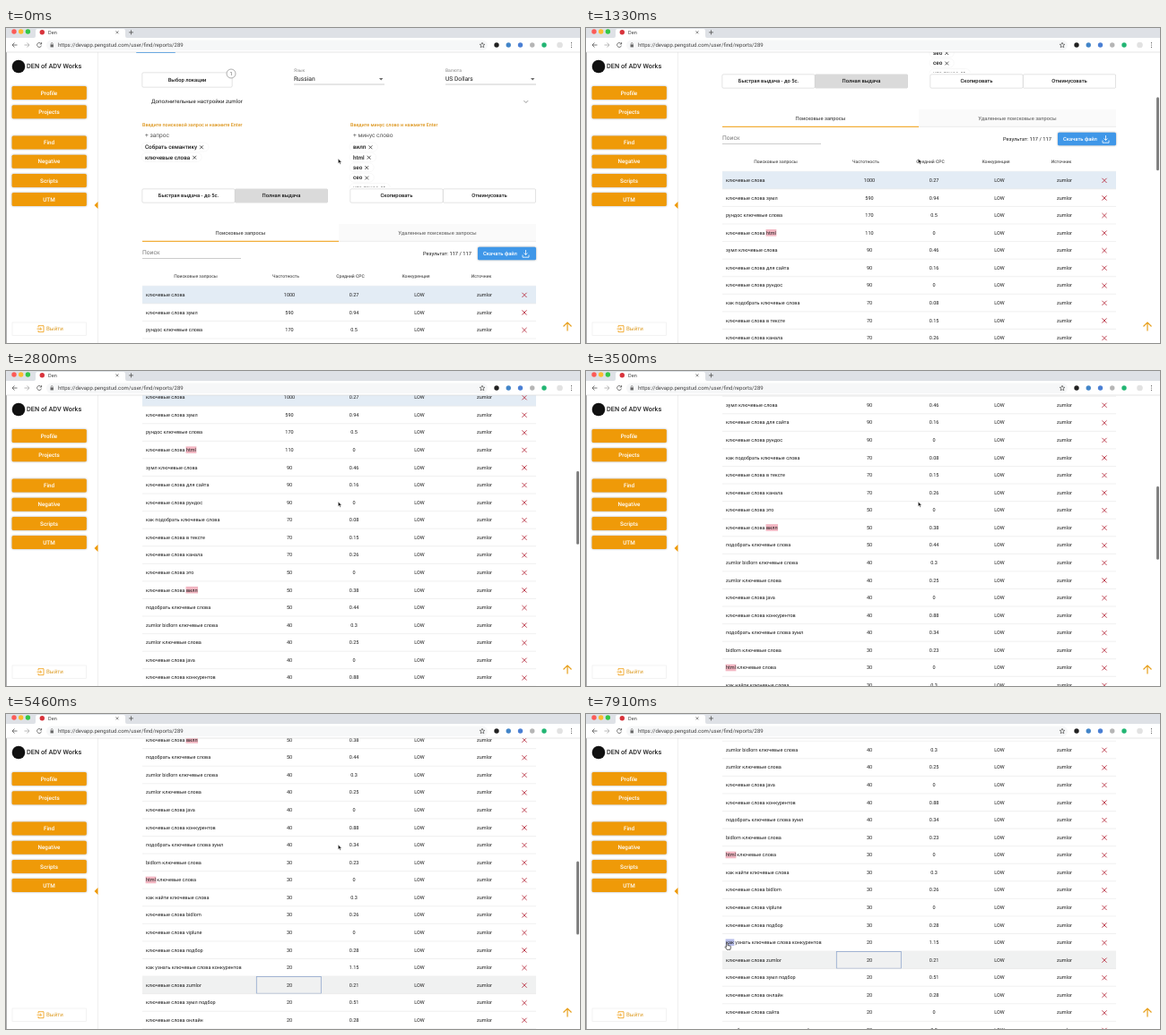
These frames come from a looping animation (640 px wide and 352 px high, 8000 ms). An HTML page:

```html
<!DOCTYPE html>
<html lang="ru">
<head>
<meta charset="utf-8">
<title>Den</title>
<style>
  html, body { margin: 0; width: 100%; height: 100%; overflow: hidden; background: #fff; }
  svg { display: block; width: 100%; height: 100%; font-family: Roboto, sans-serif; }
  text { white-space: pre; text-rendering: geometricPrecision; }
  .card { filter: drop-shadow(0 .9px .7px #0003); }
  .raised { filter: drop-shadow(0 .7px .8px #0005); }
</style>
</head>
<body>
<svg id="stage" viewBox="0 0 640 352"></svg>
<script>
const ORANGE = '#ef9a08', BLUE = '#3f97e8', INK = '#1c1c1c', LINE = '#e6e6e6';
const ROW_TOP = 298.1, ROW_STEP = 19.57;
const stage = document.getElementById('stage');

function add(parent, tag, attrs) {
  const node = document.createElementNS('http://www.w3.org/2000/svg', tag);
  for (const key in attrs) node.setAttribute(key, attrs[key]);
  return parent.appendChild(node);
}
const group = () => add(stage, 'g', {});
const rect = (g, x, y, width, height, fill, more) =>
  add(g, 'rect', { x, y, width, height, fill, ...more });
const dot = (g, cx, cy, r, fill, more) => add(g, 'circle', { cx, cy, r, fill, ...more });
const stroke = (g, d, color, width = .7, more) =>
  add(g, 'path', { d, fill: 'none', stroke: color, 'stroke-width': width, ...more });
const cross = (g, x, y, r, color, width) =>
  stroke(g, `M${x - r} ${y - r}l${2 * r} ${2 * r}m0 ${-2 * r}l${-2 * r} ${2 * r}`, color, width);

// y is the middle of the lowercase letters
function label(g, x, y, string, size, fill = INK, more) {
  const node = add(g, 'text', { x, y: y + size * .34, 'font-size': size, fill, ...more });
  node.textContent = string;
  return node;
}
const centered = (g, x, y, string, size, fill, weight = 400) =>
  label(g, x, y, string, size, fill, { 'text-anchor': 'middle', 'font-weight': weight });

function outlinedButton(g, x, y, width, height, name, fill = '#fff') {
  rect(g, x, y, width, height, fill, { stroke: '#d8d8d8', 'stroke-width': .5, rx: 1, class: 'card' });
  centered(g, x + width / 2, y + height / 2, name, 5.8, INK, 500);
}

function mark(node, start, count, y, fill) {
  const x = node.getStartPositionOfChar(start).x;
  const box = rect(node.parentNode, x - .4, y - 3.8, node.getSubStringLength(start, count) + .8, 7.6, fill);
  node.before(box);
  return box;
}

const page = group();

// Settings
rect(page, 145, 14, 44, 14, BLUE, { rx: 1 });
rect(page, 145, 30, 453, 67, '#fff', { class: 'card' });
outlinedButton(page, 152, 50, 100, 16, 'Выбор локации');
dot(page, 251, 51, 5, '#fff', { stroke: '#777', 'stroke-width': .6 });
centered(page, 251, 51, '1', 5.5, '#555');
function select(x, name, value) {
  label(page, x, 47.5, name, 5, '#888');
  label(page, x, 57, value, 6.7);
  add(page, 'path', { d: `M${x + 95} 56h4.4l-2.2 2.4z`, fill: '#666' });
  stroke(page, `M${x} 63h101`, '#999', .5);
}
select(321, 'Язык', 'Russian');
select(490, 'Валюта', 'US Dollars');
rect(page, 152, 72, 439, 19, '#fff', { class: 'card' });
label(page, 162, 81.5, 'Дополнительные настройки zumlor', 6.1);
stroke(page, 'M577.5 81.2l2.3 2.3 2.3-2.3', '#666');

// Keyword cards
function wordCard(x, title, hint, chips, buttons) {
  rect(page, x, 101, 221, 102, '#fff', { class: 'card' });
  label(page, x + 7, 108, title, 5.4, '#dc941a', { 'font-weight': 500 });
  label(page, x + 10, 120, hint, 6.6, '#555');
  chips.forEach((word, i) => {
    const y = 133 + i * 11.4;
    const node = label(page, x + 10, y, word, 6.3, INK, { 'font-weight': 500 });
    const width = node.getComputedTextLength();
    node.before(rect(page, x + 6, y - 5, width + 17, 10, '#fff', { rx: 5, stroke: '#f0f0f0', 'stroke-width': .5 }));
    cross(page, x + 15 + width, y + .3, 1.9, '#333', .8);
  });
  rect(page, x + 6, 178, 212, 22, '#fff');
  buttons.forEach(([name, fill], i) => outlinedButton(page, x + 7 + i * 103.5, 180, 103, 15, name, fill));
}
wordCard(145, 'Введите поисковой запрос и нажмите Enter', '+ запрос',
  ['Собрать семантику', 'ключевые слова'],
  [['Быстрая выдача - до 5с.'], ['Полная выдача', '#dadada']]);
wordCard(377, 'Введите минус слово и нажмите Enter', '+ минус слово',
  ['вилп', 'html', 'seo', 'сео', 'что такое'],
  [['Скопировать'], ['Отминусовать']]);

// Results
rect(page, 145, 213, 453, 760, '#fff', { class: 'card' });
rect(page, 371, 219, 220, 19, '#fafafa');
centered(page, 261.5, 229, 'Поисковые запросы', 5.75, '#555', 500);
centered(page, 481, 229, 'Удаленные поисковые запросы', 5.75, '#777', 500);
stroke(page, 'M371 238.3h220', '#ddd', .6);
stroke(page, 'M152 238.3h219', ORANGE, 1);
label(page, 152, 251, 'Поиск', 6.7, '#777');
stroke(page, 'M152 257.5h110', '#999', .5);
label(page, 465, 252.3, 'Результат: 117 / 117', 5.7);
rect(page, 526, 244.7, 65, 14.6, BLUE, { class: 'raised', rx: 1.5 });
label(page, 532, 252.1, 'Скачать файл', 5.8, '#fff', { 'font-weight': 500 });
stroke(page, 'M579.5 248v5.5m-2-2l2 2 2-2M576 253.5v2.7h7v-2.7', '#fff', .8);
[[211.5, 'Поисковые запросы'], [312, 'Частотность'], [384, 'Средний CPC'], [457, 'Конкуренция'], [530, 'Источник']]
  .forEach(([x, name]) => centered(page, x, 277, name, 5, '#555', 500));

// "~" is the shared phrase, asterisks enclose a minus word
const rows = `~|1000|0.27
~ зумл|590|0.94
рундос ~|170|0.5
~ *html*|110|0
зумл ~|90|0.46
~ для сайта|90|0.16
~ рундос|90|0
как подобрать ~|70|0.08
~ в тексте|70|0.15
~ канала|70|0.26
~ это|50|0
~ *вилп*|50|0.38
подобрать ~|50|0.44
zumlor bidlorn ~|40|0.3
zumlor ~|40|0.25
~ java|40|0
~ конкурентов|40|0.88
подобрать ~ зумл|40|0.34
bidlorn ~|30|0.23
*html* ~|30|0
как найти ~|30|0.3
~ bidlorn|30|0.26
~ viplune|30|0
~ подбор|30|0.28
как узнать ~ конкурентов|20|1.15
~ zumlor|20|0.21
~ зумл подбор|20|0.51
~ онлайн|20|0.28
~ сайта|20|0
подобрать ~ для сайта|20|0.3`.split('\n');
const FOCUSED = 25, HOVERED = 24;
let hoverMark;

stroke(page, `M152 ${ROW_TOP - ROW_STEP / 2}h439`, LINE, .6);
rows.forEach((row, i) => {
  const y = ROW_TOP + i * ROW_STEP, top = y - ROW_STEP / 2;
  const [phrase, count, price] = row.replace('~', 'ключевые слова').split('|');
  if (i === 0) rect(page, 152, top, 439, ROW_STEP, '#e3ecf5');
  if (i === FOCUSED) {
    rect(page, 152, top, 439, ROW_STEP, '#f0f1f1');
    rect(page, 279.3, top + .4, 72, ROW_STEP - .8, 'none', { stroke: '#8fa6cc', 'stroke-width': .8 });
  }
  stroke(page, `M152 ${top + ROW_STEP}h439`, LINE, .6);
  const node = label(page, 156, y, phrase.replaceAll('*', ''), 5.5);
  const minus = phrase.match(/\*(.+)\*/);
  if (minus) mark(node, minus.index, minus[1].length, y, '#f2b6c2');
  if (i === HOVERED) hoverMark = mark(node, 0, 3, y, '#b7bdea');
  [[316, count], [388, price], [461, 'LOW'], [533.5, 'zumlor']]
    .forEach(([x, value]) => centered(page, x, y, value, 5.5));
  cross(page, 578, y + .3, 2.6, '#b93546', .9);
});

// Sidebar
const side = group();
rect(side, 0, 27, 102.5, 325, '#fff');
stroke(side, 'M102.5 27v325', '#e4e4e4', .6);
dot(side, 14, 43, 7.3, '#111');
label(side, 23, 43, 'DEN of ADV Works', 7.3, '#222', { 'font-weight': 500 });
[['Profile', 72.5], ['Projects', 93.8], ['Find', 128], ['Negative', 149.2], ['Scripts', 170.4], ['UTM', 191.6]]
  .forEach(([name, y]) => {
    rect(side, 6.6, y - 7.5, 83.2, 15, ORANGE, { rx: 1.5, class: 'raised' });
    centered(side, 48, y, name, 6.3, '#fff', 500);
  });
add(side, 'path', { d: 'M102.5 194v8l-4-4z', fill: ORANGE });
rect(side, 7, 329, 82.5, 14.5, '#fff', { stroke: '#eee', 'stroke-width': .7 });
stroke(side, 'M36 334.5v-1.8h6v7h-6v-1.8M34.5 336.2h5m-1.6-1.6l1.6 1.6-1.6 1.6', ORANGE, .8);
label(side, 45, 336.3, 'Выйти', 6.2, '#dc9a20');
stroke(side, 'M626 338.5v-9.5m-4.5 4.5l4.5-4.5 4.5 4.5', '#e8a01c', 1.2);
stroke(side, 'M.3 11v341', '#555', .6);

// Browser frame
const frame = group();
rect(frame, 0, 0, 640, 11, '#dee1e6');
rect(frame, 0, 11, 640, 16, '#fff');
stroke(frame, 'M0 27h640', '#d5d5d5', .6);
['#fc5b57', '#fdbc2f', '#33c748'].forEach((color, i) => dot(frame, 9 + i * 7.7, 4, 2.7, color));
add(frame, 'path', { d: 'M31 11q2 0 2-2v-6q0-2 2-2h96q2 0 2 2v6q0 2 2 2z', fill: '#fff' });
dot(frame, 40.3, 4.7, 2.7, '#d8343c');
label(frame, 47, 4.9, 'Den', 5.6, '#444');
cross(frame, 124, 4.8, 1.5, '#555', .7);
stroke(frame, 'M139.5 2.4v5m-2.5-2.5h5', '#555', .8);
rect(frame, 45, 13.5, 492, 11.5, '#f6f7f8', { rx: 5.7 });
stroke(frame, 'M12.5 19h-5.5m2.5-2.5l-2.5 2.5 2.5 2.5', '#555', .8);
stroke(frame, 'M20.5 19h5.5m-2.5-2.5l2.5 2.5-2.5 2.5', '#aaa', .8);
stroke(frame, 'M39.2 17.6a2.5 2.5 0 1 0 .3 2M39.6 16v2h-2', '#555', .8);
rect(frame, 49.5, 18.4, 3.4, 3, '#666');
stroke(frame, 'M50.2 18.5v-1a1 1 0 0 1 2 0v1', '#666', .6);
label(frame, 58, 19, 'https://devapp.pengstud.com/user/find/reports/289', 6, '#444');
stroke(frame, 'M531 16.2l.8 2 2.1.1-1.6 1.4.5 2.1-1.8-1.2-1.8 1.2.5-2.1-1.6-1.4 2.1-.1z', '#555', .7);
['#222', '#4285c8', '#4a7fd4', '#b5b5b5', '#22b573']
  .forEach((color, i) => dot(frame, 547 + i * 13.25, 19, 2.7, color));
dot(frame, 617.5, 19, 3.3, '#e2e2e2');
[16.7, 19, 21.3].forEach(y => dot(frame, 630.5, y, .6, '#555'));

// Moving overlay
const thumb = rect(stage, 636, 0, 3, 82, '#808080', { rx: 1.5 });
const arrow = add(stage, 'path', {
  d: 'M0 0v5.4l1.3-1.1.9 2 1-.4-.9-2h1.7z', fill: '#111', stroke: '#fff', 'stroke-width': .5
});
const hand = add(stage, 'path', {
  d: 'M-.8 0q.8-1 1.4 0v2.6l2.8.6q.8.3.6 1.2l-.6 2.9h-3.8l-2.2-3q.2-1 1.8.2z',
  fill: '#fff', stroke: '#222', 'stroke-width': .7
});

const LOOP = 8000, TICK = 70;
const scrollKeys = [[0, 0], [130, 0], [1330, 128], [2100, 199], [3500, 338.4], [4690, 429.2], [5850, 512.5], [LOOP, 512.5]];
const progress = (t, from, to) => Math.min(1, Math.max(0, (t - from) / (to - from)));
const ease = p => p * p * (3 - 2 * p);

function scrollAt(t) {
  const i = scrollKeys.findIndex(([time]) => time > t);
  const [t0, y0] = scrollKeys[i - 1], [t1, y1] = scrollKeys[i];
  return y0 + (y1 - y0) * progress(t, t0, t1);
}

function draw(now) {
  const t = Math.floor(now % LOOP / TICK) * TICK;
  const scroll = scrollAt(t);
  page.setAttribute('transform', `translate(0 ${-scroll})`);
  thumb.setAttribute('y', 45.8 + scroll * .245);
  thumb.setAttribute('opacity', t < 140 ? 0 : 1 - progress(t, 6350, 6600));

  const move = ease(progress(t, 6700, 7560));
  const place = `translate(${370.3 - 212.8 * move} ${146 + 110 * move})`;
  const overWord = move > .97;
  arrow.setAttribute('transform', place);
  hand.setAttribute('transform', place);
  arrow.setAttribute('visibility', overWord ? 'hidden' : 'visible');
  hand.setAttribute('visibility', overWord ? 'visible' : 'hidden');
  hoverMark.setAttribute('visibility', overWord ? 'visible' : 'hidden');
}

const start = performance.now();
function loop() {
  draw(performance.now() - start);
  requestAnimationFrame(loop);
}
loop();
</script>
</body>
</html>
```
